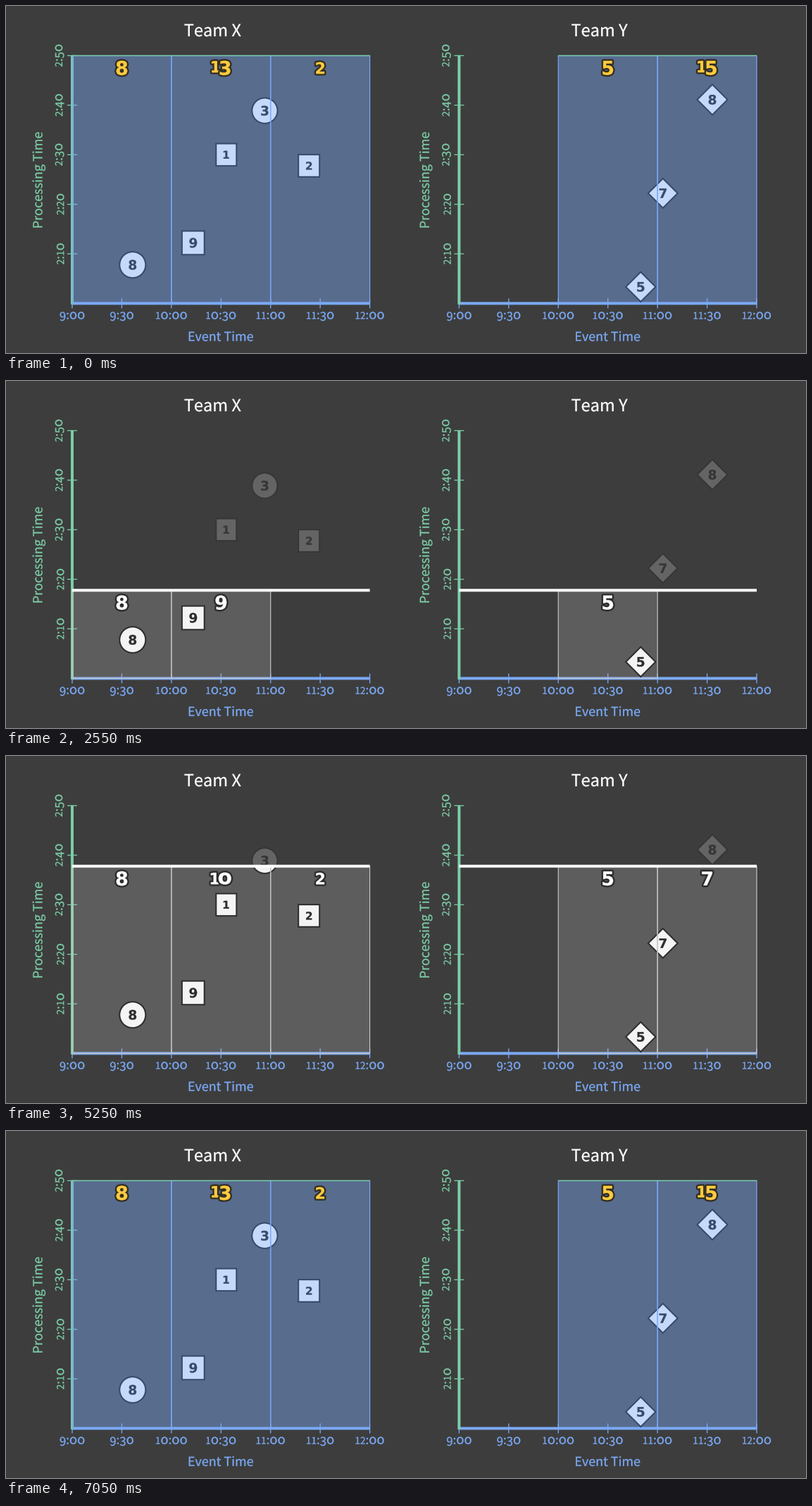
A matplotlib script for the animation above (9.9 s loop, 1136 by 493 pixels).

```python
import matplotlib.pyplot as plt
from matplotlib.animation import FuncAnimation
from matplotlib.patches import Circle, PathPatch, Polygon, Rectangle
from matplotlib.path import Path
from matplotlib.textpath import TextPath
from matplotlib.transforms import Affine2D

W, H, DPI = 1136, 493, 64
PT = 72 / DPI                      # points per pixel
FRAMES, STEP_MS = 66, 150
LAST = 47                          # step at which the result is shown

BG, GREEN, BLUE = "#3d3d3d", "#7ccda7", "#7baaf7"
TOP, BASE, PLOT_W = 70.5, 422.5, 422.6
RISE = (BASE - TOP) / 45           # travel of the line per step
HOUR = PLOT_W / 3
TEAMS = [("Team X", 94.0), ("Team Y", 643.4)]

# team, shape, x, arrival step, value, hour window, (half width, half height)
ITEMS = [
    (0, "circle", 179.8, 7, 8, 0, (18.5, 18.5)),
    (0, "square", 265.8, 11, 9, 1, (15.9, 16.8)),
    (0, "square", 430.2, 25, 2, 2, (15.0, 15.8)),
    (0, "square", 312.8, 27, 1, 1, (14.5, 15.8)),
    (0, "circle", 367.4, 35, 3, 1, (18.1, 18.1)),
    (1, "diamond", 901.3, 3, 5, 1, (21.1, 21.1)),
    (1, "diamond", 932.8, 20, 7, 2, (20.9, 20.9)),
    (1, "diamond", 1003.0, 37, 8, 2, (21.5, 21.5)),
]

SANS = dict(family="Noto Sans CJK JP")
BOLD = dict(family="DejaVu Sans", weight="bold")

fig = plt.figure(figsize=(W / DPI, H / DPI), dpi=DPI, facecolor=BG)
ax = fig.add_axes([0, 0, 1, 1])
ax.set_xlim(0, W)
ax.set_ylim(H, 0)
ax.axis("off")

moving = []
cache = {}


def add(patch, z):
    patch.set_zorder(z)
    patch.set_snap(False)
    ax.add_patch(patch)
    return patch


def stroke(points, color, width, z):
    return add(PathPatch(Path(points), fc="none", ec=color, lw=width * PT,
                         capstyle="butt"), z)


# ---- text -------------------------------------------------------------

def oldstyle(text, px, font, track=0.0):
    """Glyph paths with text figures: 0-2 small, 3 4 5 7 9 descending."""
    key = (text, px, font["family"])
    if key in cache:
        return cache[key]

    def glyph(ch):
        return TextPath((0, 0), ch, size=px, prop=font)

    grow = 1.1                     # small figures stand a little over x-height
    low = grow * glyph("x").get_extents().height
    digit = glyph("1").get_extents().height
    out, pen = [], 0
    for ch in text:
        path = glyph("o" if ch == "0" else ch)
        pair = glyph("oo" if ch == "0" else ch * 2)
        scale = grow if ch == "0" else low / digit if ch in "12" else 1
        drop = low - digit if ch in "34579" else 0
        advance = pair.get_extents().x1 - path.get_extents().x1
        out.append(path.transformed(
            Affine2D().scale(scale).translate(pen, drop)))
        pen += advance * scale + track * px
    cache[key] = out
    return out


def place(paths, x, y, v=0.5, rot=0):
    """Centre the paths on x; v picks bottom (0) to top (1) of the ink for y."""
    box = Path.make_compound_path(*paths).get_extents()
    move = (Affine2D()
            .translate(-(box.x0 + box.x1) / 2, -(box.y0 + v * box.height))
            .rotate_deg(rot).scale(1, -1).translate(x, y))
    return [p.transformed(move) for p in paths]


def write(paths, color, z, outline=None, weight=0.25):
    made = []
    for p in paths:
        if outline:
            made.append(add(PathPatch(p, fc=outline, ec=outline, lw=5 * PT,
                                      joinstyle="round"), z))
        made.append(add(PathPatch(p, fc=color, ec=color, lw=weight * PT), z))
    return made


def label(text, x, y, px, color, v=0.0, rot=0):
    path = TextPath((0, 0), text, size=px, prop=SANS)
    write(place([path], x, y, v, rot), color, 1)


def tick_label(text, x, y, color, v, rot=0):
    write(place(oldstyle(text, 16.8, SANS), x, y, v, rot), color, 1)


# ---- parts ------------------------------------------------------------

def item(spec, fill, ink, z):
    _, kind, x, step, value, _, (a, b) = spec
    y = BASE - step * RISE
    style = dict(fc=fill, ec=ink, lw=2 * PT, joinstyle="miter")
    if kind == "circle":
        body = Circle((x, y), a, **style)
    elif kind == "square":
        body = Rectangle((x - a, y - b), 2 * a, 2 * b, **style)
    else:
        body = Polygon([(x, y - b), (x + a, y), (x, y + b), (x - a, y)], **style)
    digits = place(oldstyle(str(value), 18.5, BOLD), x, y)
    return [add(body, z)] + write(digits, ink, z)


def axes(title, x0):
    mid = x0 + PLOT_W / 2
    label(title, mid - 11.8, 43.3, 23.6, "white")
    label("Event Time", mid, 476.2, 17.9, BLUE)
    label("Processing Time", x0 - 47.2, 247, 18, GREEN, 0.5, 90)
    stroke([(x0, BASE), (x0 + PLOT_W, BASE)], BLUE, 4, 1)
    for i in range(7):
        x = x0 + i * HOUR / 2
        stroke([(x, BASE - 7), (x, BASE + 7)], BLUE, 1.3, 1)
        tick_label(f"{9 + i // 2}:{'30' if i % 2 else '00'}", x, 434.5, BLUE, 1)
    stroke([(x0, TOP - 0.6), (x0, BASE + 1.5)], GREEN, 4, 1)
    for i in range(1, 6):
        y = BASE - i * (BASE - TOP) / 5
        stroke([(x0 - 7, y), (x0 + 7, y)], GREEN, 1.3, 1)
        tick_label(f"2:{i}0", x0 - 11.5, y, GREEN, 0, 90)


def windows(team, x0, step, y, done):
    """Shaded hour windows that have data, with their running sums."""
    fill, alpha, edge = (BLUE, 0.44, BLUE) if done else ("#cfcfcf", 0.22, "#c4c4c4")
    for hour in range(3):
        values = [s[4] for s in ITEMS
                  if s[0] == team and s[5] == hour and s[3] <= step]
        if not values:
            continue
        x = x0 + hour * HOUR
        made = [
            add(Rectangle((x, y), HOUR, BASE - y, fc=fill, alpha=alpha, lw=0), 4),
            add(Rectangle((x, y), HOUR, BASE - y, fc="none", ec=edge,
                          lw=1.2 * PT), 5),
        ]
        if done:
            made.append(stroke([(x, y), (x + HOUR, y)], GREEN, 1.4, 6))
        digits = place(oldstyle(str(sum(values)), 27, BOLD, -0.12),
                       x + HOUR / 2, y + 17.5)
        color, rim = ("#ffcb3f", "#332f22") if done else ("white", "#2b2b2b")
        moving.extend(made + write(digits, color, 8, rim))


for name, left in TEAMS:
    axes(name, left)
for spec in ITEMS:
    item(spec, "#646464", "#363636", 2)
lit = [p for spec in ITEMS for p in item(spec, "white", "black", 3)]


def draw(frame):
    while moving:
        moving.pop().remove()
    n = min(frame, LAST)
    done = n in (0, LAST)
    step = 45 if done else n - 1
    y = BASE - step * RISE
    # items light up only below the line
    edge = 0 if done else y
    for p in lit:
        p.set_clip_path(Rectangle((0, edge), W, H - edge, transform=ax.transData))
    for team, (_, x0) in enumerate(TEAMS):
        windows(team, x0, step, y, done)
        if not done:
            top = max(y - 2, TOP - 0.5)
            moving.append(add(Rectangle((x0, top), PLOT_W, y + 2 - top,
                                        fc="white", lw=0), 7))
    return moving


anim = FuncAnimation(fig, draw, frames=FRAMES, interval=STEP_MS,
                     init_func=lambda: draw(0), repeat=True, repeat_delay=0)
plt.show()
```
